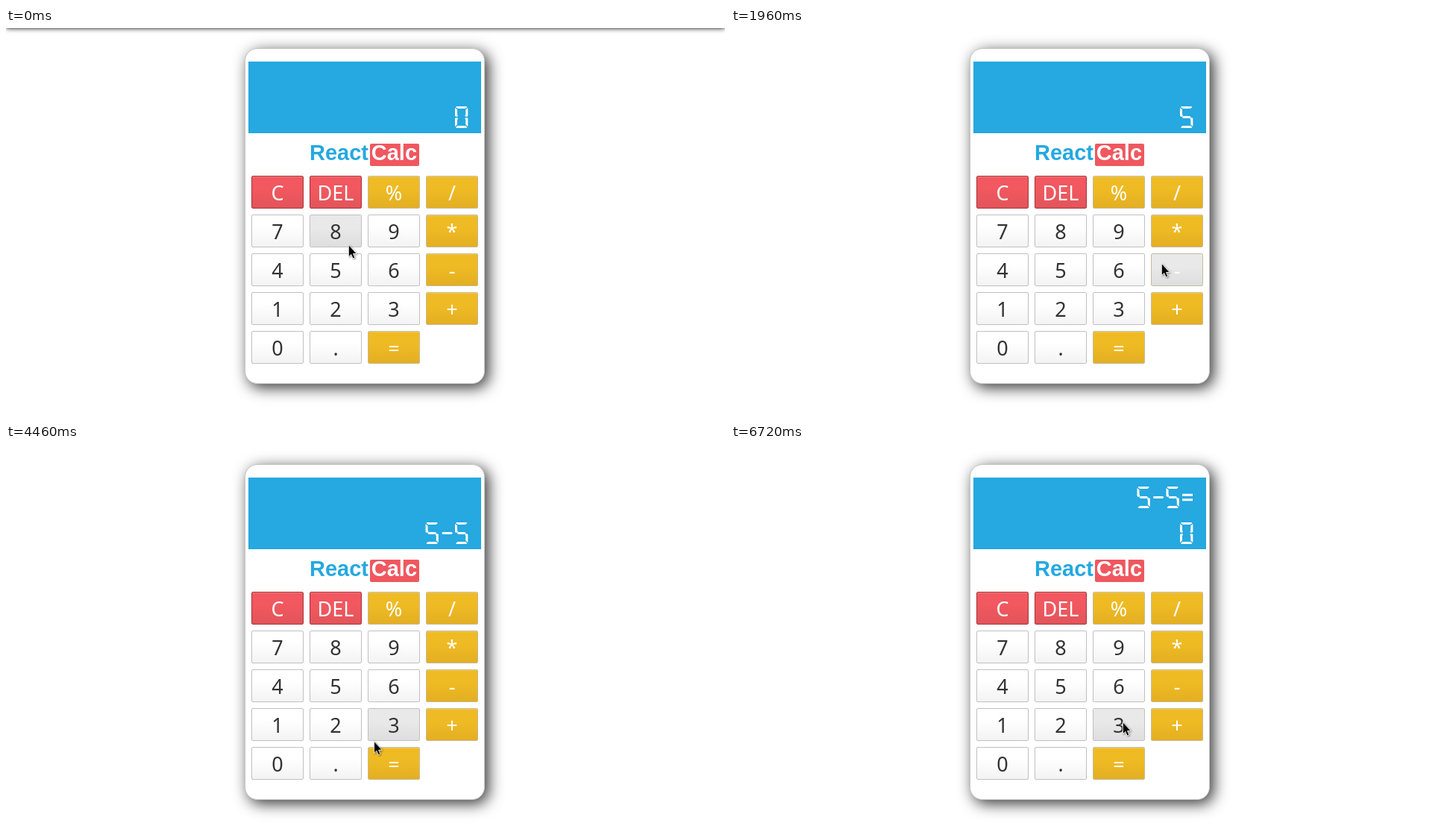
An HTML page for the animation above (8 s loop, 964 by 520 pixels).

```html
<!DOCTYPE html>
<html lang="en">
<head>
<meta charset="utf-8">
<title>Calculator</title>
<style>
  html, body { margin: 0; width: 100%; height: 100%; overflow: hidden; background: #fff; }
  .stage { position: relative; width: 964px; height: 520px; overflow: hidden; }
  .stage > * { position: absolute; }
  .edge, .show, .key::before, .cursor { animation: 8s linear infinite; }
  .edge, .show, .key::before { animation-timing-function: step-end; }

  .edge { left: 0; right: 0; top: -10px; height: 10px; box-shadow: 0 0 7px #000; animation-name: edge; }
  .card {
    left: 320px; top: 27px; width: 320px; height: 448px;
    border: 1px solid #c4c4c4; border-radius: 17px; background: #fff;
    box-shadow: 5px 5px 20px rgba(0, 0, 0, .8);
  }
  .face { left: 0; top: 0; }
  .name { font: bold 29px "Liberation Sans", Arial, sans-serif; }

  .keys {
    left: 329px; top: 198px;
    display: grid; grid-template-columns: repeat(4, 70px); grid-auto-rows: 44px; gap: 8px;
  }
  .key {
    position: relative; isolation: isolate; box-sizing: border-box;
    border: 1px solid #c0c0c0; border-radius: 2px;
    background: linear-gradient(#fff 35%, #f3f3f3);
    font: 27px/43px "Noto Sans", "Open Sans", sans-serif; text-align: center; color: #333;
  }
  .op, .red { color: #fff; box-shadow: inset 0 1px rgba(255, 255, 255, .2); }
  .op { background: linear-gradient(#efbb24 40%, #e3ae22); border-color: #c6bb9e; }
  .red { background: linear-gradient(#f1585f 40%, #e2545b); border-color: #a5343b; }
  .key::before {
    content: ""; position: absolute; inset: 0; z-index: -1; opacity: 0;
    background: linear-gradient(#e9e9e9 40%, #dedede);
  }
  .k8::before { animation-name: hover8; }
  .k5::before { animation-name: hover5; }
  .k6::before { animation-name: hover6; }
  .k3::before { animation-name: hover3; }
  .minus::before { animation-name: hoverMinus; }
  .equal::before { animation-name: hoverEqual; }

  .s1 { animation-name: show1; }
  .s2 { animation-name: show2; }
  .s3 { animation-name: show3; }
  .s4 { animation-name: show4; }
  .s5 { animation-name: show5; }

  .cursor {
    left: 0; top: 0; overflow: visible; animation-name: move;
    filter: drop-shadow(1px 1px 1px rgba(0, 0, 0, .45));
  }

  @keyframes edge { 0% { opacity: 1 } 23%, 100% { opacity: 0 } }

  @keyframes show1 { 0% { opacity: 1 } 23%, 100% { opacity: 0 } }
  @keyframes show2 { 0% { opacity: 0 } 23% { opacity: 1 } 33.5%, 100% { opacity: 0 } }
  @keyframes show3 { 0% { opacity: 0 } 33.5% { opacity: 1 } 52.25%, 100% { opacity: 0 } }
  @keyframes show4 { 0% { opacity: 0 } 52.25% { opacity: 1 } 66.75%, 100% { opacity: 0 } }
  @keyframes show5 { 0% { opacity: 0 } 66.75%, 100% { opacity: 1 } }

  @keyframes hover8 { 0% { opacity: 1 } 8.5%, 100% { opacity: 0 } }
  @keyframes hover5 {
    0% { opacity: 0 } 9.75% { opacity: 1 } 24.5% { opacity: 0 }
    40.75% { opacity: 1 } 54.25%, 100% { opacity: 0 }
  }
  @keyframes hoverMinus { 0% { opacity: 0 } 24.5% { opacity: 1 } 37%, 100% { opacity: 0 } }
  @keyframes hover6 { 0% { opacity: 0 } 37% { opacity: 1 } 40%, 100% { opacity: 0 } }
  @keyframes hover3 {
    0% { opacity: 0 } 55.25% { opacity: 1 } 58% { opacity: 0 }
    70.75%, 100% { opacity: 1 }
  }
  @keyframes hoverEqual { 0% { opacity: 0 } 58% { opacity: 1 } 69.75%, 100% { opacity: 0 } }

  @keyframes move {
    0% { transform: translate(459px, 291px) }
    7% { transform: translate(459px, 291px); animation-timing-function: ease-out }
    14% { transform: translate(453px, 320px); animation-timing-function: step-end }
    24.5%, 26% { transform: translate(577px, 316px) }
    28.25% { transform: translate(611px, 323px); animation-timing-function: step-end }
    33.5%, 35% { transform: translate(600px, 320px) }
    35.25% { transform: translate(575px, 317px) }
    36.75% { transform: translate(549px, 317px); animation-timing-function: ease-out }
    45.25% { transform: translate(460px, 315px) }
    47%, 52.25% { transform: translate(458px, 317px) }
    56.25% { transform: translate(498px, 410px); animation-timing-function: step-end }
    58%, 59.5% { transform: translate(509px, 418px) }
    62.75%, 66.75% { transform: translate(512px, 422px) }
    73.75%, 75.25% { transform: translate(521px, 385px) }
    75.5%, 76.75% { transform: translate(522px, 378px) }
    78.75% { transform: translate(524px, 374px); animation-timing-function: step-end }
    84%, 100% { transform: translate(525px, 373px) }
  }
</style>
</head>
<body>
<div class="stage">
  <div class="edge"></div>
  <div class="card"></div>

  <svg class="face" width="964" height="520">
    <defs>
      <path id="top" d="M2.5 0H15.5L17 1 14.5 3H4L1.5 1z"/>
      <path id="upL" d="M.5 2L3.5 4.5V10.5L4.5 13 2.5 14 .5 13z"/>
      <path id="upR" d="M17.8 2L14.8 4.5V10.5L13.8 13 15.8 14 17.8 13z"/>
      <path id="lowL" d="M.5 27L3.5 24.5V18.5L4.5 16 2.5 15 .5 16z"/>
      <path id="lowR" d="M17.8 27L14.8 24.5V18.5L13.8 16 15.8 15 17.8 16z"/>
      <path id="base" d="M2.5 29H15.5L17 28 14.5 26H4L1.5 28z"/>
      <path id="mid" d="M5 13H13.5L15.3 14.5 13.5 16H5L3.2 14.5z"/>
      <g id="zero"><use href="#top"/><use href="#upL"/><use href="#upR"/><use href="#lowL"/><use href="#lowR"/><use href="#base"/></g>
      <g id="five"><use href="#top"/><use href="#upL"/><use href="#mid"/><use href="#lowR"/><use href="#base"/></g>
      <path id="dash" d="M4.5 13H16.5L17.8 14.5 16.5 16H4.5L3.2 14.5z"/>
      <path id="same" d="M3.5 9.8H17.5V12.8H3.5zM3.5 16.2H17.5V19.2H3.5z"/>
    </defs>

    <rect x="325" y="45" width="312" height="96" fill="#26a8e0"/>
    <g fill="#fff">
      <g class="show s1"><use href="#zero" x="601.5" y="105"/></g>
      <g class="show s2"><use href="#five" x="601.5" y="105"/></g>
      <g class="show s3">
        <use href="#five" x="583" y="105"/><use href="#dash" x="601.5" y="105"/>
      </g>
      <g class="show s4">
        <use href="#five" x="562" y="105"/><use href="#dash" x="581" y="105"/><use href="#five" x="601.5" y="105"/>
      </g>
      <g class="show s5">
        <use href="#five" x="544" y="57"/><use href="#dash" x="562.5" y="57"/>
        <use href="#five" x="583" y="57"/><use href="#same" x="601.5" y="57"/>
        <use href="#zero" x="601.5" y="105"/>
      </g>
    </g>

    <rect x="488" y="155" width="66" height="30" rx="2" fill="#f0575f"/>
    <g class="name">
      <text x="407" y="177" fill="#26a8e0">React</text>
      <text x="489.8" y="177" fill="#fff">Calc</text>
    </g>
  </svg>

  <div class="keys">
    <div class="key red">C</div><div class="key red">DEL</div><div class="key op">%</div><div class="key op">/</div>
    <div class="key">7</div><div class="key k8">8</div><div class="key">9</div><div class="key op">*</div>
    <div class="key">4</div><div class="key k5">5</div><div class="key k6">6</div><div class="key op minus">-</div>
    <div class="key">1</div><div class="key">2</div><div class="key k3">3</div><div class="key op">+</div>
    <div class="key">0</div><div class="key">.</div><div class="key op equal">=</div>
  </div>

  <svg class="cursor" width="14" height="22">
    <path d="M.3 -.5V15.8L3.8 12.5 6.1 18 8.8 16.9 6.5 11.5H11.2z" fill="#000" stroke="#fff" stroke-width=".9"/>
  </svg>
</div>
</body>
</html>
```
